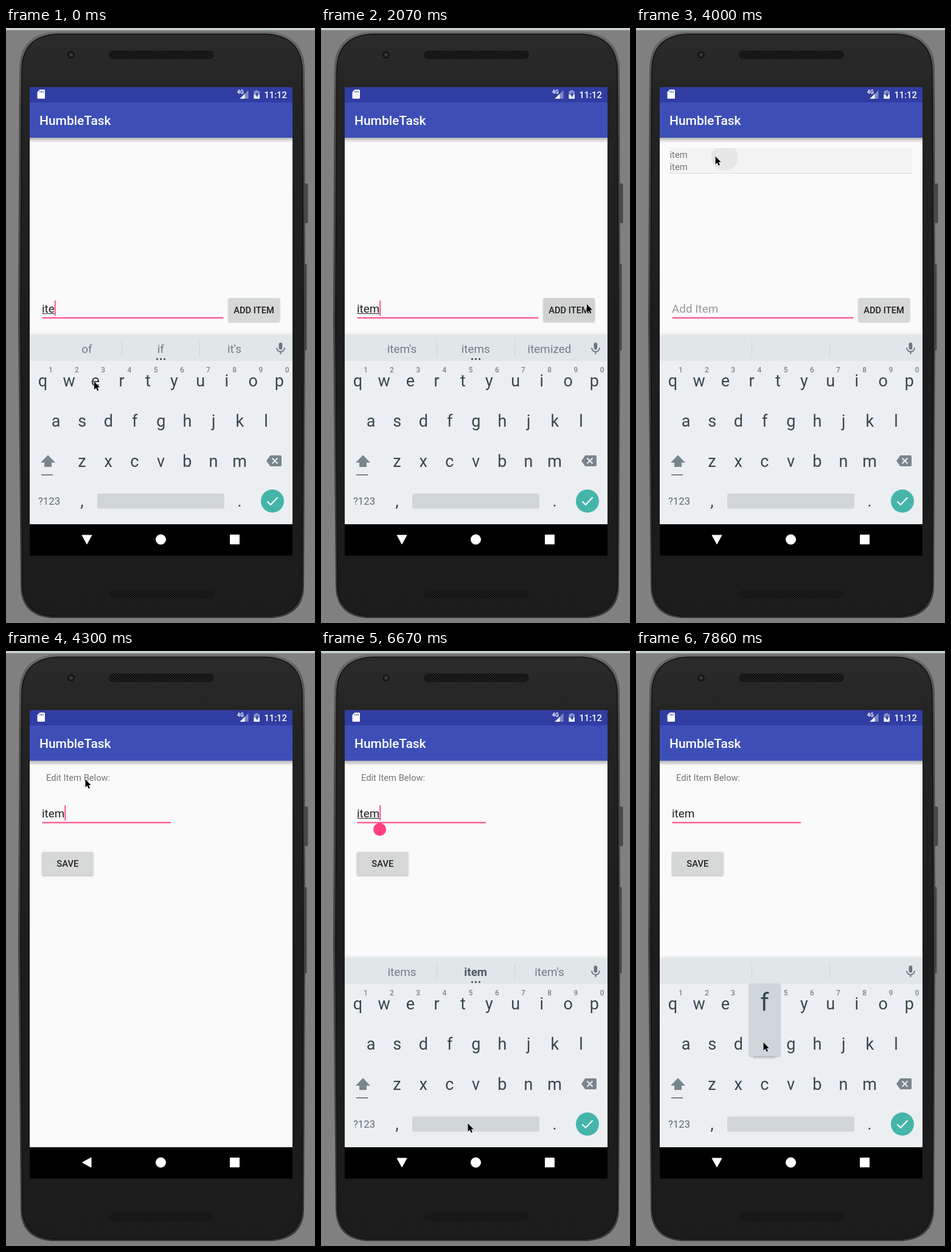
An HTML page that plays this animation: 508 px wide and 976 px high, repeating every 8 s.

```html
<!DOCTYPE html>
<html lang="en">
<head>
<meta charset="utf-8">
<title>To-do app on a phone</title>
<style>
html, body { margin: 0; width: 100%; height: 100%; overflow: hidden; background: #808080; }
svg { display: block; width: 508px; height: 976px; font-family: Roboto, Arial, sans-serif; }
.mid { text-anchor: middle; }
.med { font-weight: 500; }
.field { font-size: 18.9px; fill: #212121; }
.small { font-size: 14.7px; fill: #757575; }
.btn { font-size: 14.7px; font-weight: 500; fill: #212121; text-anchor: middle; }
.key { font-size: 27px; fill: #37474f; text-anchor: middle; }
.num { font-size: 12px; font-weight: 500; fill: #78868c; text-anchor: middle; }
.sug { font-size: 18.9px; fill: #727e83; text-anchor: middle; }
.sug.bold { font-weight: 700; fill: #4b5a61; }
</style>
</head>
<body>
<svg viewBox="0 0 508 976">
  <defs>
    <linearGradient id="body" x2="0" y2="1">
      <stop offset="0" stop-color="#2b2b2b"/><stop offset=".1" stop-color="#242424"/>
      <stop offset=".5" stop-color="#1d1d1d"/><stop offset="1" stop-color="#1c1c1c"/>
    </linearGradient>
    <linearGradient id="rim" x2="0" y2="1">
      <stop offset="0" stop-color="#6b6b6b"/><stop offset=".12" stop-color="#454545"/>
      <stop offset="1" stop-color="#3a3a3a"/>
    </linearGradient>
    <linearGradient id="drop" x2="0" y2="1">
      <stop offset="0" stop-color="#000" stop-opacity=".28"/><stop offset="1" stop-color="#000" stop-opacity="0"/>
    </linearGradient>
    <pattern id="mesh" width="4" height="4" patternUnits="userSpaceOnUse">
      <rect width="4" height="4" fill="#262626"/>
      <circle cx="1" cy="1" r="1.15" fill="#080808"/><circle cx="3" cy="3" r="1.15" fill="#080808"/>
    </pattern>
    <filter id="lift" x="-20%" y="-20%" width="140%" height="150%">
      <feDropShadow dx="0" dy="1" stdDeviation="1" flood-opacity=".3"/>
    </filter>
    <clipPath id="screen"><rect x="39" y="97" width="432" height="717"/></clipPath>
    <clipPath id="row"><rect x="55" y="197" width="399" height="41"/></clipPath>
  </defs>

  <rect width="508" height="976" fill="#808080"/>
  <rect width="508" height="3.5" fill="#cbd3d5"/>

  <!-- phone -->
  <rect x="489" y="255" width="7.5" height="65" rx="2" fill="#484848"/>
  <rect x="488" y="387" width="6.5" height="142" rx="2" fill="#484848"/>
  <path d="M22 66Q23 9 82 6H430Q489 9 491 66L492 480L490 918Q488 964 438 968H74Q26 964 24 918L20 480Z" fill="url(#rim)"/>
  <path d="M26 68Q27 13 84 10H428Q485 13 487 68L489 480L487 916Q484 961 436 965H76Q29 961 27 916L24 480Z" fill="url(#body)" stroke="#111" stroke-width="1.5"/>
  <circle cx="107" cy="44" r="6" fill="#151515"/><circle cx="107" cy="44" r="3" fill="#363a3c"/>
  <rect x="169" y="37" width="173" height="14" rx="7" fill="url(#mesh)"/>
  <rect x="169" y="921.5" width="173" height="14" rx="7" fill="url(#mesh)"/>

  <g clip-path="url(#screen)">
    <rect x="39" y="97" width="432" height="717" fill="#fafafa"/>

    <g id="list">
      <g id="ripple" clip-path="url(#row)">
        <rect x="55" y="197" width="399" height="41" fill="#f3f3f3"/>
        <circle cx="145.5" cy="212" r="22" fill="#e7e7e7"/>
      </g>
      <g id="entry">
        <text class="small" x="55.5" y="213">item</text>
        <text class="small" x="55.5" y="233">item</text>
        <rect x="55" y="238" width="399" height="1" fill="#dcdcdc"/>
      </g>
      <text id="hint" class="field" x="59" y="467" style="fill:#9a9a9a">Add Item</text>
      <rect x="59.5" y="474.5" width="298" height="2" fill="#ff4081"/>
      <rect id="addBtn" x="365.5" y="443" width="84.5" height="38.5" rx="2" filter="url(#lift)"/>
      <text class="btn" x="407.5" y="467.5">ADD ITEM</text>
    </g>

    <g id="edit">
      <rect x="39" y="180" width="432" height="634" fill="#fafafa"/>
      <text class="small" x="66" y="213">Edit Item Below:</text>
      <rect x="59.5" y="280.5" width="211.5" height="2" fill="#ff4081"/>
      <path id="handle" d="M96.5 280.5L104.2 285.5A10.5 10.5 0 1 1 88.8 285.5Z" fill="#ff4081"/>
      <rect x="59" y="329.5" width="84.5" height="38.5" rx="2" fill="#d6d7d7" filter="url(#lift)"/>
      <text class="btn" x="101.3" y="354">SAVE</text>
    </g>

    <g id="input">
      <text id="typed" class="field"></text>
      <rect id="mark" x=".5" y="1" height="1" fill="#212121"/>
      <rect id="caret" y="-20" width="1.8" height="25" fill="#ff4081"/>
    </g>

    <g id="board">
      <rect x="39" y="500" width="432" height="3.5" fill="#eff1f2"/>
      <rect x="39" y="503" width="432" height="43" fill="#e1e6e9"/>
      <rect x="39" y="546" width="432" height="268" fill="#eceff1"/>
      <path d="M190.5 513V538M318.5 513V538" stroke="#cbd2d5"/>
      <g id="sugs"></g>
      <path id="dots" d="M248.5 543h.01m6 0h.01m6 0h.01" stroke="#37474f" stroke-width="3.2" stroke-linecap="round"/>
      <g fill="none" stroke="#69767c" stroke-width="1.9">
        <rect x="448.6" y="516" width="5.6" height="11.6" rx="2.8" fill="#69767c" stroke="none"/>
        <path d="M445 524.5A6.5 6.5 0 0 0 458 524.5M451.5 531V535"/>
      </g>
      <g id="keys"></g>
      <path d="M69 700.5L81 713H75V720H63V713H57Z" fill="#78868c"/>
      <rect x="58" y="732" width="19" height="2" fill="#78868c"/>
      <path d="M428 710L434.5 701H451Q453 701 453 703V717Q453 719 451 719H434.5Z" fill="#78868c"/>
      <path d="M437.5 705.5L446.5 714.5M446.5 705.5L437.5 714.5" stroke="#eceff1" stroke-width="2"/>
      <text class="mid" x="71" y="782" font-size="16.7" fill="#5c6a71">?123</text>
      <rect x="150" y="763.5" width="209" height="25" rx="4" fill="#d0d5d7"/>
      <circle cx="438" cy="776" r="19" fill="#45b5aa"/>
      <path d="M429.5 776.5L435 782L446.5 770" fill="none" stroke="#fff" stroke-width="2.2"/>
      <g id="popup">
        <rect x="193" y="664" width="36" height="5" fill="#d3d8da"/>
        <rect x="186" y="545.5" width="51" height="119" rx="2" fill="#cfd5d8" filter="url(#lift)"/>
        <text id="popText" class="mid" x="211.5" y="589.5" font-size="41" fill="#37474f"></text>
      </g>
    </g>

    <!-- bars -->
    <rect x="39" y="180" width="432" height="8" fill="url(#drop)"/>
    <rect x="39" y="97" width="432" height="25" fill="#303da2"/>
    <rect x="39" y="122" width="432" height="58" fill="#3d4fb7"/>
    <text class="med" x="55" y="159" font-size="21" fill="#fff">HumbleTask</text>
    <path d="M55.5 101H62.5Q64 101 64 102.5V114.5Q64 116 62.5 116H53Q51.5 116 51.5 114.5V105Z" fill="#fff"/>
    <path d="M56 103V106M58.5 103V106M61 103V106" stroke="#303da2"/>
    <text x="380" y="108" font-size="8.5" font-weight="700" fill="#fff">4G</text>
    <path d="M398.5 102V116H384.5Z" fill="#8088c4"/>
    <path d="M392.5 108V116H384.5Z" fill="#fff"/>
    <path d="M410 103.5V102H414V103.5H417V116H407.5V103.5Z" fill="#8a92ca"/>
    <path d="M407.5 109H417V116H407.5Z" fill="#fff"/>
    <path d="M413.5 104.5L409.5 110.5H412V114.5L415.5 108.5H413Z" fill="#303da2"/>
    <text class="med" x="424.5" y="115" font-size="14.7" fill="#fff">11:12</text>
  </g>

  <rect x="39" y="814" width="432" height="51.5" fill="#000"/>
  <g fill="#fff" stroke="#fff" stroke-linejoin="round">
    <path id="back" d="M125 832H141L133 846.5Z"/>
    <circle cx="254.5" cy="839" r="8"/>
    <rect x="368.5" y="831.5" width="15" height="15"/>
  </g>
  <g id="arrow">
    <path transform="scale(.88)" d="M0 0V15L3.5 11.7L6 17.3L8.4 16.3L6 10.8H10.5Z" stroke="#fff" paint-order="stroke"/>
  </g>
</svg>

<script>
const LOOP = 8000, TICK = 148.15, BLINK = 500;  // ms; all times below are in ticks
const $ = id => document.getElementById(id);

function addText(parent, cls, x, y, str = '') {
  const el = document.createElementNS('http://www.w3.org/2000/svg', 'text');
  el.setAttribute('class', cls);
  el.setAttribute('x', x);
  el.setAttribute('y', y);
  el.textContent = str;
  return parent.appendChild(el);
}

// Keyboard
const PITCH = 43.2, ROW = 66;
const keyAt = {};
[['qwertyuiop', 60.5], ['asdfghjkl', 82], ['zxcvbnm', 125]].forEach(([letters, x], r) =>
  [...letters].forEach((c, i) => {
    keyAt[c] = [x + i * PITCH, 588 + r * ROW];
    addText($('keys'), 'key', ...keyAt[c], c);
  }));
[...'1234567890'].forEach((c, i) => addText($('keys'), 'num', 73.3 + i * PITCH, 564.5, c));
addText($('keys'), 'key', 125, 785, ',');
addText($('keys'), 'key', 384, 785, '.');
const sugs = [0, 1, 2].map(i => addText($('sugs'), 'sug', 133 + i * 121.25, 533));

// Text in the focused field and the words offered; each edit restarts the caret blink
const edits = [
  { at: 0, text: 'ite', words: ['of', 'if', "it's"] },
  { at: 6, text: 'item', words: ["item's", 'items', 'itemized'] },
  { at: 15, text: '' },
  { at: 28, text: 'item' },
  { at: 38, text: 'item', words: ['items', 'item', "item's"] },
  { at: 48, text: 'item\u00a0' }
];

// Pointer moves: from, to, x, y
const home = [145, 580];
const moves = [
  [0, 3, 315, 762], [3, 5, 381, 712], [6, 11, 437, 453], [17, 19, 320, 382],
  [20, 25, 130.5, 210.5], [30, 35, 120.5, 268.5], [39, 44, 241.5, 775], [48, 51, 209.5, 642]
];

function ramp(n, from, to) {
  const k = Math.min(1, Math.max(0, (n - from) / (to - from)));
  return k * k * (3 - 2 * k);
}
const pointer = n => moves.reduce(([px, py], [from, to, x, y]) => {
  const k = ramp(n, from, to);
  return [px + (x - px) * k, py + (y - py) * k];
}, home);

const show = (id, on) => $(id).setAttribute('opacity', +on);
const move = (id, x, y) => $(id).setAttribute('transform', `translate(${x} ${y})`);
const between = (n, a, b) => n >= a && n < b;

function drawInput(n, editing, slide) {
  const { at, text, words = ['', '', ''] } = edits.findLast(e => e.at <= n);
  const composing = words[1] !== '';
  $('typed').textContent = text;
  const width = $('typed').getComputedTextLength();
  move('input', 59, editing ? 273 + slide : 467);
  $('mark').setAttribute('width', width);
  show('mark', composing);
  $('caret').setAttribute('x', width);
  show('caret', Math.floor((n - at) * TICK / BLINK) % 2 === 0);
  show('hint', !text);

  sugs.forEach((el, i) => { el.textContent = words[i]; });
  sugs[1].setAttribute('class', words[1] === text ? 'sug bold' : 'sug');
  show('dots', composing);
}

function draw(n) {
  const opened = ramp(n, 27, 29), slide = 60 * (1 - opened);
  show('edit', opened);
  move('edit', 0, slide);
  drawInput(n, n >= 28, slide);
  move('board', 0, 330 * (opened - ramp(n, 37, 39)));

  show('entry', n >= 15);
  show('ripple', n === 27);
  show('handle', n < 48 && ramp(n, 36, 37.6));
  $('addBtn').setAttribute('fill', between(n, 13, 16) ? '#d0d1d1' : '#d6d7d7');
  $('back').setAttribute('transform', `rotate(${between(n, 29, 37) ? 90 : 0} 133 839)`);

  const key = between(n, 5, 7) ? 'm' : n >= 52 ? 'f' : '';
  show('popup', key !== '');
  if (key) move('popup', keyAt[key][0] - keyAt.f[0], keyAt[key][1] - keyAt.f[1]);
  $('popText').textContent = key;

  move('arrow', ...pointer(n));
}

const start = performance.now();
function loop() {
  const t = (performance.now() - start) % LOOP;
  draw(Math.floor((t + 8) / TICK));
  requestAnimationFrame(loop);
}
loop();
</script>
</body>
</html>
```
